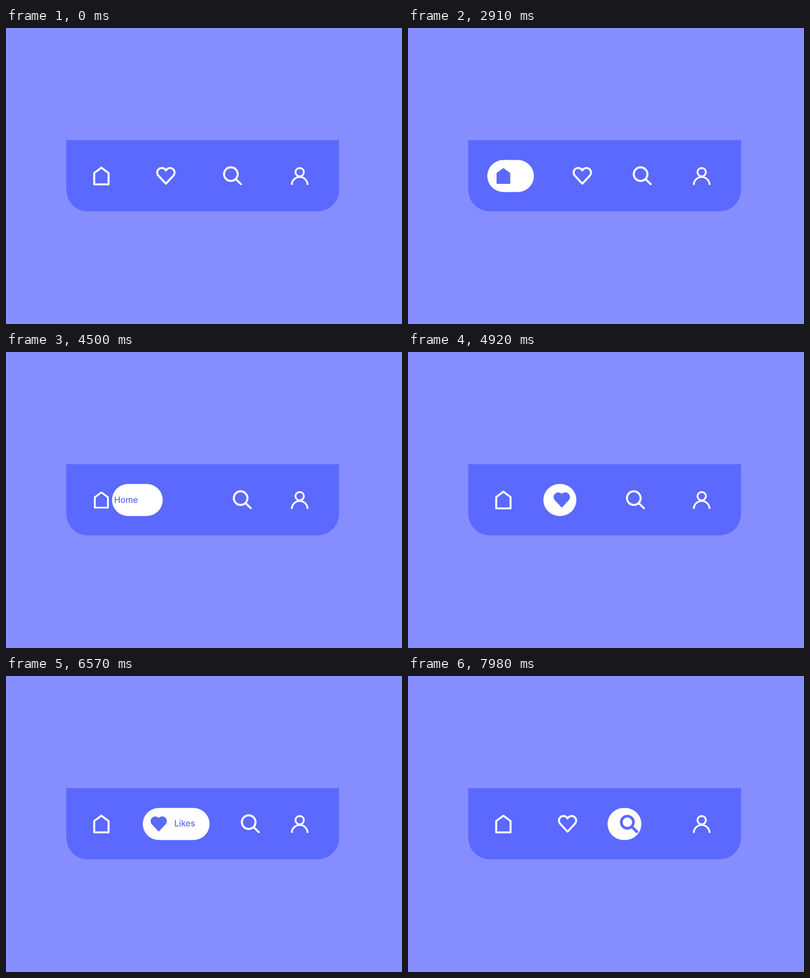
An HTML page with a canvas for the animation above (8 s loop, 800 by 600 pixels).

```html
<!DOCTYPE html>
<html lang="en">
<head>
<meta charset="utf-8">
<title>Tab bar</title>
<style>
  html, body { margin: 0; width: 100%; height: 100%; overflow: hidden; background: #868eff; }
  canvas { display: block; width: 800px; height: 600px; }
</style>
</head>
<body>
<canvas id="stage" width="800" height="600"></canvas>
<script>
const ctx = document.getElementById('stage').getContext('2d');
const BACK = '#868eff', BAR = '#5b69ff', WHITE = '#fff';
const LOOP = 8000, MOVE = 800, SMALL = 0.84;

// Resting layouts: pill left, width and opacity, icon centres and icon scales.
const rest = { tab: '', x: 160.2, w: 65, a: 0, heart: 323, search: 458, homeS: 1, heartS: 1, searchS: 1 };
const homeDot = { ...rest, tab: 'home', a: 1, search: 459, homeS: SMALL };
const homeOpen = { ...homeDot, w: 135, heart: 393, search: 494 };
const likesDot = { ...rest, tab: 'likes', x: 276.3, a: 1, heart: 308.6, search: 459, heartS: SMALL };
const likesOpen = { ...likesDot, w: 135, search: 494 };
const searchDot = { ...rest, tab: 'search', x: 409.5, a: 1, search: 444.2, searchS: 0.93 };

const steps = [
  [-MOVE, rest], [1160, homeDot], [2708, homeOpen],
  [4280, likesDot], [5606, likesOpen], [7400, searchDot]
];

const labels = {
  home: { text: 'Home', x: 223.7, y: 305.8 },
  likes: { text: 'Likes', x: 340, y: 304.6 }
};

const clamp = v => Math.min(1, Math.max(0, v));
const mix = (a, b, p) => a + (b - a) * p;

// cubic-bezier(.25, .1, .25, 1)
function ease(t) {
  if (t <= 0 || t >= 1) return clamp(t);
  const curve = (a, b, s) => 3 * a * s * (1 - s) ** 2 + 3 * b * s * s * (1 - s) + s ** 3;
  let lo = 0, hi = 1;
  for (let i = 0; i < 24; i++) {
    const mid = (lo + hi) / 2;
    if (curve(0.25, 0.25, mid) < t) lo = mid; else hi = mid;
  }
  return curve(0.1, 1, lo);
}

function stateAt(time) {
  let i = steps.length - 1;
  while (i > 0 && steps[i][0] > time) i--;
  const to = steps[i][1], from = steps[Math.max(0, i - 1)][1];
  const p = ease((time - steps[i][0]) / MOVE);
  const now = { tab: to.tab, from, to, p };
  for (const key in to) if (key !== 'tab') now[key] = mix(from[key], to[key], p);
  return now;
}

function drawIcon(x, y, scale, active, draw) {
  ctx.save();
  ctx.translate(x, y);
  ctx.scale(scale, scale);
  ctx.strokeStyle = ctx.fillStyle = active ? BAR : WHITE;
  ctx.lineWidth = 4;
  ctx.lineJoin = 'round';
  ctx.beginPath();
  draw(active);
  ctx.stroke();
  ctx.restore();
}

function house(active) {
  ctx.moveTo(0, -16.9);
  ctx.lineTo(14.5, -6);
  ctx.lineTo(14.5, 17);
  ctx.lineTo(-14.5, 17);
  ctx.lineTo(-14.5, -6);
  ctx.closePath();
  if (active) ctx.fill();
}

function heart(active) {
  const notch = 0.468;
  ctx.arc(8.3, -7, 9.3, notch - Math.PI, Math.PI / 4);
  ctx.lineTo(0, 15.6);
  ctx.arc(-8.3, -7, 9.3, Math.PI * 0.75, Math.PI * 2 - notch);
  ctx.closePath();
  if (active) ctx.fill();
}

function lens(active) {
  ctx.lineWidth = active ? 5.8 : 4.1;
  ctx.lineCap = 'round';
  ctx.arc(-3.7, -3.8, active ? 13.2 : 13.8, 0, Math.PI * 2);
  ctx.moveTo(7, 7);
  ctx.lineTo(16.8, 16.6);
}

function person() {
  ctx.lineWidth = 3.7;
  ctx.arc(0, -7.7, 8.5, 0, Math.PI * 2);
  ctx.moveTo(-16, 18);
  ctx.arc(0, 18, 16, Math.PI, 0);
}

function box(x, y, w, h, radii, color) {
  ctx.fillStyle = color;
  ctx.beginPath();
  ctx.roundRect(x, y, w, h, radii);
  ctx.fill();
}

function drawLabel(s) {
  const opening = s.to.w > s.from.w;
  const label = labels[opening ? s.to.tab : s.from.tab];
  if (!label) return;
  const alpha = opening ? clamp((s.p - 0.45) / 0.4) : clamp((0.8 - s.p) / 0.2);
  const slide = opening ? 1 - s.p : s.p;
  ctx.globalAlpha = alpha;
  ctx.fillStyle = BAR;
  ctx.font = '500 17px Inter, sans-serif';
  ctx.fillText(label.text, label.x - 11 * slide, label.y);
  ctx.globalAlpha = 1;
}

function render(time) {
  const s = stateAt(time);
  ctx.fillStyle = BACK;
  ctx.fillRect(0, 0, 800, 600);
  box(121.7, 227.5, 551.2, 144.3, [0, 0, 44, 44], BAR);
  ctx.globalAlpha = s.a;
  box(s.x, 267.5, s.w, 65, 32.5, WHITE);
  ctx.globalAlpha = 1;
  drawLabel(s);
  drawIcon(192.7, 300, s.homeS, s.tab === 'home', house);
  drawIcon(s.heart, 300, s.heartS, s.tab === 'likes', heart);
  drawIcon(s.search, 300, s.searchS, s.tab === 'search', lens);
  drawIcon(593.3, 300, 1, false, person);
}

function frame() {
  render(performance.now() % LOOP);
  requestAnimationFrame(frame);
}
frame();
</script>
</body>
</html>
```
